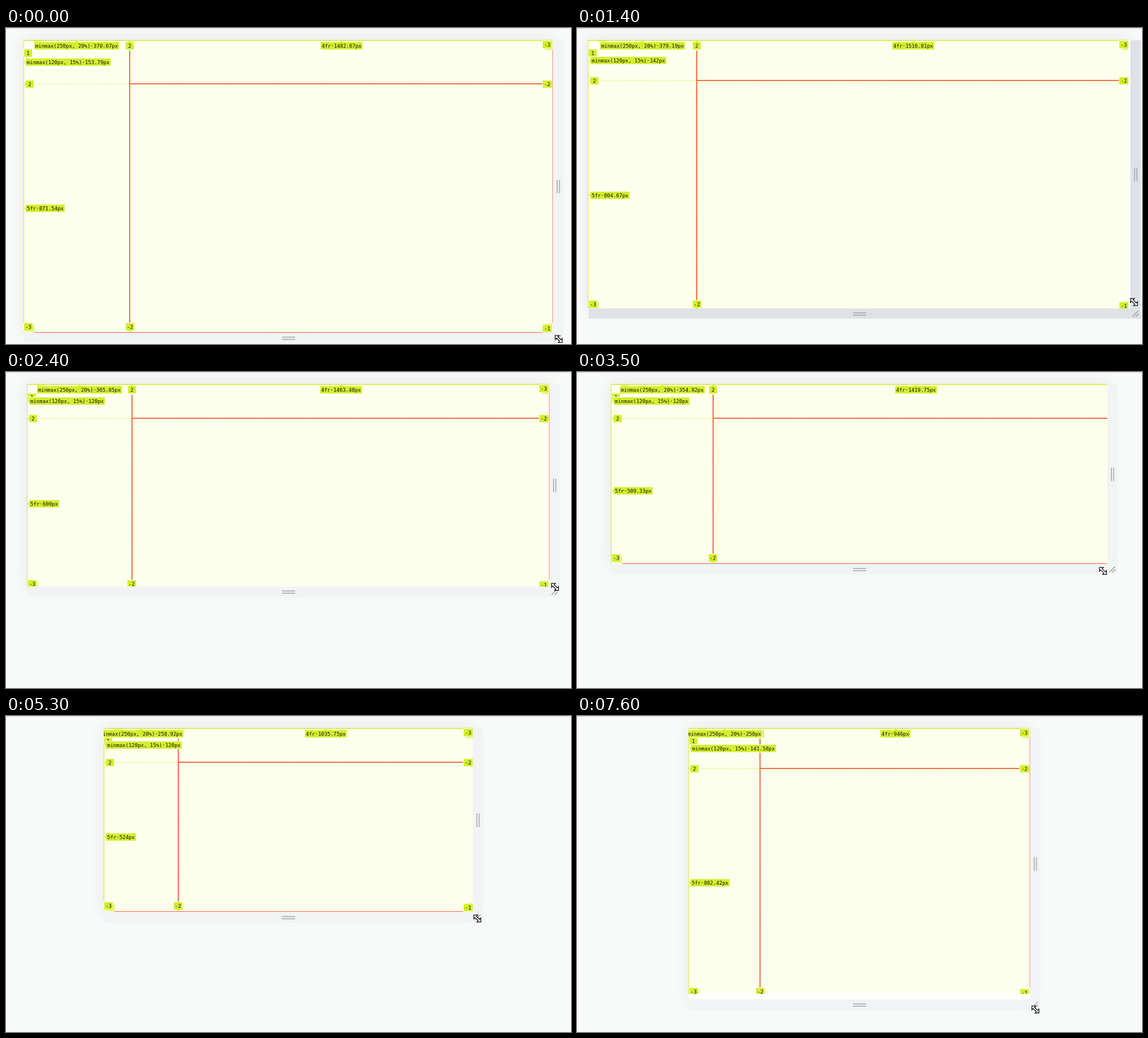
An HTML page with a canvas for the animation above (8 s loop, 1000 by 560 pixels).

```html
<!DOCTYPE html>
<html lang="en">
<head>
<meta charset="utf-8">
<title>Grid resize</title>
<style>
  html, body { margin: 0; width: 100%; height: 100%; overflow: hidden; background: #f8faf9; }
  canvas { display: block; width: 1000px; height: 560px; }
</style>
</head>
<body>
<canvas id="stage" width="1000" height="560"></canvas>
<script>
const ctx = document.getElementById('stage').getContext('2d');
const LOOP = 8000, TOP = 22, SCALE = 0.6737, BAR = 18;
const PAGE = '#f8faf9', TINT = '#fcffeb', LIME = '#d4ee2e', RED = '#ff5a40', GREY = '#a2a4a6';

// The frame is ahead of the overlay, the pointer ahead of the frame (ms)
const FRAME_LEAD = 80, POINTER_LEAD = 150, PAINT_DELAY = 60;

// Key points of the drag: time, width, height
const DRAG = [
  [0, 1390, 769], [900, 1390, 769], [1400, 1422, 710], [1500, 1424, 704],
  [1800, 1398, 630], [2000, 1382, 594], [2400, 1372, 540], [3000, 1368, 478],
  [3500, 1331, 472], [3700, 1258, 474], [4500, 1043, 480], [4700, 994, 481],
  [5600, 960, 484], [6000, 944, 496], [6400, 926, 525], [6500, 920, 541],
  [6900, 919, 590], [7600, 897, 708], [8000, 893, 734]
];

// Moments at which the picture is refreshed
const STEPS = [0];
for (let t = 1000; t <= 2400; t += 100) STEPS.push(t);
STEPS.push(3000, 3200, 3500, 3700, 4100, 4200, 4500, 4700, 5100, 5300, 5600);
for (let t = 6000; t <= 7600; t += 400) STEPS.push(t);

function sizeAt(t) {
  const i = Math.max(1, DRAG.findIndex(p => p[0] >= t));
  const [t0, w0, h0] = DRAG[i - 1], [t1, w1, h1] = DRAG[i];
  const k = Math.max(0, (t - t0) / (t1 - t0));
  return { w: w0 + (w1 - w0) * k, h: h0 + (h1 - h0) * k };
}

const rightOf = s => 500 + s.w * SCALE / 2;
const bottomOf = s => TOP + s.h * SCALE;

// Track sizes snap down to 1/48 px
const snap = v => Math.floor(v * 48 + 1e-6) / 48;
const px = v => +v.toFixed(2) + 'px';

function box(x0, y0, x1, y1, color) {
  ctx.fillStyle = color;
  ctx.fillRect(x0, y0, x1 - x0, y1 - y0);
}

function line(x0, y0, x1, y1, color, width = 1, dash = []) {
  ctx.strokeStyle = color;
  ctx.lineWidth = width;
  ctx.setLineDash(dash);
  ctx.beginPath();
  ctx.moveTo(x0, y0);
  ctx.lineTo(x1, y1);
  ctx.stroke();
  ctx.setLineDash([]);
}

function poly(points, fill) {
  ctx.beginPath();
  points.forEach(([x, y]) => ctx.lineTo(x, y));
  ctx.closePath();
  ctx.fillStyle = fill;
  ctx.fill();
}

// Label centred on x, y, with an optional pointer towards dx, dy
function label(text, x, y, width, dx = 0, dy = 0) {
  const w = Math.round(width), x0 = Math.round(x - w / 2), cy = Math.round(y) - 0.5;
  const cx = x0 + w / 2;
  box(x0 - 1, cy - 7.5, x0 + w + 1, cy + 7.5, TINT);
  box(x0, cy - 6.5, x0 + w, cy + 6.5, LIME);
  if (dx || dy) {
    const ex = cx + dx * w / 2, ey = cy + dy * 6.5;
    poly([[ex - dy * 3, ey - dx * 3], [ex + dx * 2.5, ey + dy * 2.5],
          [ex + dy * 3, ey + dx * 3]], LIME);
  }
  ctx.fillStyle = '#111';
  ctx.fillText(text, cx, cy + 3.5);
}

function sizeLabel(text, x, y, fromLeft) {
  const w = ctx.measureText(text).width + 4;
  label(text, fromLeft ? x + w / 2 : x, y, w, fromLeft ? -1 : 0, fromLeft ? 0 : -1);
}

// Red rule with a dashed edge on its far side
function divider(pos, from, to, vertical) {
  const p = Math.round(pos);
  const draw = (at, ...style) => vertical ? line(at, from, at, to, ...style) : line(from, at, to, at, ...style);
  draw(p, RED, 2);
  draw(p + 0.5, '#d9a03a', 1, [3, 2]);
}

function drawPage() {
  box(0, 0, 1000, 560, PAGE);
  box(0, 0, 1000, 1.5, '#dcdfde');
}

function drawFrame(L, R, B, active) {
  ctx.save();
  ctx.shadowColor = 'rgba(0,0,0,0.09)';
  ctx.shadowBlur = 28;
  box(L, TOP, R, B, '#fff');
  ctx.restore();
  const bar = active ? '#dee1e6' : '#f1f3f4';
  box(R, TOP, R + BAR, B + BAR, bar);
  box(L, B, R, B + BAR, bar);

  const gx = R + 9.3, gy = B + 9.8, mid = (TOP + B) / 2;
  for (const d of [-2, 2]) {
    line(gx + d, mid - 12, gx + d, mid + 12, GREY, 1.5);
    line(488.5, gy + d, 512, gy + d, GREY, 1.5);
  }
  line(gx - 5.5, gy + 4.5, gx + 4.5, gy - 5.5, GREY, 1.6);
  line(gx, gy + 4.5, gx + 5, gy - 0.5, GREY, 1.6);
}

function drawOverlay(L, clipR, clipB, size) {
  const W = Math.round(size.w) * 4 / 3, H = Math.round(size.h) * 4 / 3, k = SCALE * 0.75;
  const c1 = Math.max(250, snap(W * 0.2)), r1 = Math.max(120, snap(H * 0.15));
  const R = L + W * k, B = TOP + H * k;
  const col = L + c1 * k, row = TOP + r1 * k;
  const left = Math.round(L) - 0.5, right = Math.round(R) - 0.5, base = Math.round(B) - 0.5;

  ctx.save();
  ctx.beginPath();
  ctx.rect(left - 0.5, TOP - 1, clipR - left + 0.5, clipB - TOP + 1);
  ctx.clip();
  box(L, TOP, R, B, TINT);

  line(left, TOP, R, TOP, '#dcec5a', 2);
  line(left, TOP, left, B, LIME);
  line(right, 39, right, B - 18, '#ff8a78');
  line(L + 18, base, R - 19, base, RED);
  line(L + 22, Math.round(row) - 0.5, col, Math.round(row) - 0.5, '#dcee5c', 1, [3, 2]);
  divider(row - 0.4, col, R - 19, false);
  divider(col, 40, B - 18, true);

  // Stacked corner markers
  box(L + 1.5, 23.5, L + 15, 38, '#fff');
  line(L + 17, 23.5, L + 31, 23.5, LIME);
  box(L + 4, B - 14, L + 18, B - 2, LIME);
  box(R - 14, 25, R - 0.5, 38.5, LIME);
  box(R - 14, B - 16, R - 1, B - 3, LIME);

  label('1', L + 7.5, 45, 14);
  label('2', L + 10.2, row, 14, -1, 0);
  label('-3', L + 8, B - 10, 15);
  label('2', col, 32, 14, 0, -1);
  label('-2', col, B - 10, 15, 0, 1);
  label('-3', R - 10.2, 29.5, 15.5);
  label('-2', R - 10.2, row, 15.5, 1, 0);
  label('-1', R - 10.2, B - 7.5, 15.5);

  sizeLabel('minmax(250px, 20%)·' + px(c1), (L + col) / 2, 32);
  sizeLabel('4fr·' + px(W - c1), (col + R) / 2, 32);
  sizeLabel('minmax(120px, 15%)·' + px(r1), L + 3.3, (TOP + row) / 2, true);
  sizeLabel('5fr·' + px(H - r1), L + 3.3, (row + B) / 2, true);
  ctx.restore();
}

// Diagonal double arrow; the second head mirrors the first
function drawPointer(x, y) {
  const head = [[-3.9, -1.6], [-6.2, 0.7], [-6.2, -6.2], [0.7, -6.2], [-1.6, -3.9]];
  const points = head.concat(head.map(([a, b]) => [-a, -b]));
  poly(points.map(([a, b]) => [x + a, y + b]), '#fff');
  ctx.strokeStyle = '#111';
  ctx.lineWidth = 1.3;
  ctx.stroke();
}

function render(now) {
  const time = now % LOOP;
  const t = STEPS.filter(s => s <= time).pop();
  const frame = sizeAt(t + FRAME_LEAD), pointer = sizeAt(t + FRAME_LEAD + POINTER_LEAD);
  const painted = sizeAt(t - PAINT_DELAY);
  const R = rightOf(frame), B = bottomOf(frame), L = 1000 - R;

  ctx.font = '9px "DejaVu Sans Mono", monospace';
  ctx.textAlign = 'center';
  drawPage();
  drawFrame(L, R, B, t >= 1300 && t <= 1600);
  drawOverlay(L, Math.min(R, L + painted.w * SCALE), Math.min(B, bottomOf(painted)), sizeAt(t));
  drawPointer(rightOf(pointer) + 10, bottomOf(pointer) + 11);
}

const start = performance.now();
function tick() {
  render(performance.now() - start);
  requestAnimationFrame(tick);
}
tick();
</script>
</body>
</html>
```
